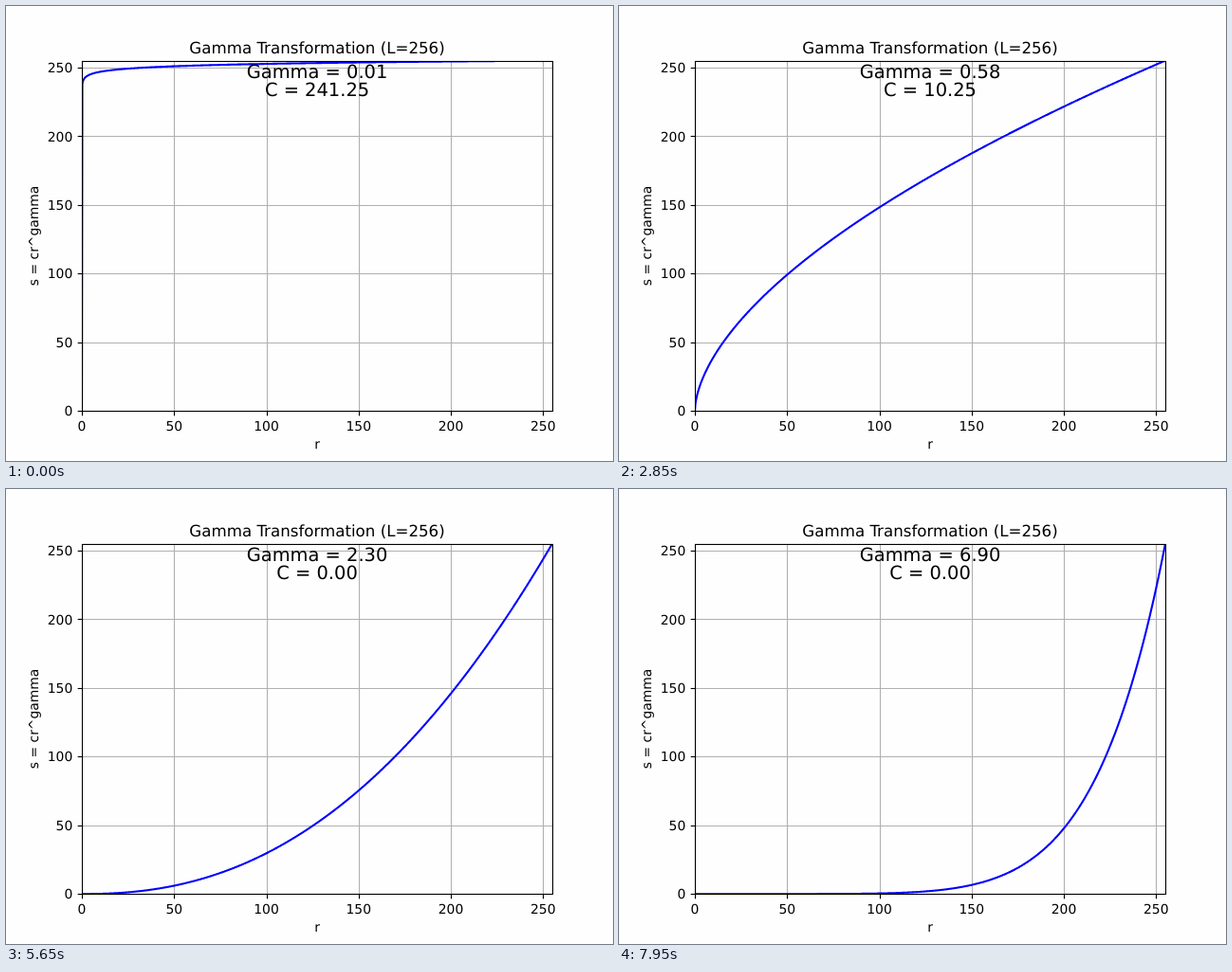
These frames come from a looping animation (640 by 480 pixels, 8000 ms). An HTML page with a canvas:

```html
<!DOCTYPE html>
<html lang="en">
<head>
<meta charset="utf-8">
<title>Gamma Transformation</title>
<style>
  html, body { margin: 0; width: 100%; height: 100%; overflow: hidden; background: #fefefe; }
  canvas { display: block; }
</style>
</head>
<body>
<canvas id="stage" width="640" height="480"></canvas>
<script>
const ctx = document.getElementById("stage").getContext("2d");

const PERIOD = 8000, STEP = 50;
const MAX = 255, SAMPLES = 1000;
const LEFT = 80, RIGHT = 576, TOP = 57.6, BOTTOM = 427.2;
const CENTER = (LEFT + RIGHT) / 2;
const POINT = 100 / 72; // pixels per typographic point
const THIN = 0.8 * POINT, TICK = 3.5 * POINT;

const toX = r => LEFT + r / MAX * (RIGHT - LEFT);
const toY = s => BOTTOM - s / MAX * (BOTTOM - TOP);
const snap = v => Math.floor(v + 0.5) + 0.5;

function line(x1, y1, x2, y2, color) {
  ctx.strokeStyle = color;
  ctx.lineWidth = THIN;
  ctx.beginPath();
  ctx.moveTo(x1, y1);
  ctx.lineTo(x2, y2);
  ctx.stroke();
}

function label(text, x, y, points, align = "center") {
  ctx.font = `${points * POINT}px "DejaVu Sans", sans-serif`;
  ctx.textAlign = align;
  ctx.fillStyle = "#000";
  ctx.fillText(text, x, y);
}

function clipToAxes(paint) {
  ctx.save();
  ctx.beginPath();
  ctx.rect(LEFT, Math.round(TOP), RIGHT - LEFT, Math.round(BOTTOM) - Math.round(TOP));
  ctx.clip();
  paint();
  ctx.restore();
}

function drawGrid() {
  for (let value = 0; value <= 250; value += 50) {
    const x = snap(toX(value)), y = snap(toY(value));
    clipToAxes(() => {
      line(x, TOP, x, BOTTOM, "#b0b0b0");
      line(LEFT, y, RIGHT, y, "#b0b0b0");
    });
    line(x, snap(BOTTOM), x, snap(BOTTOM) + TICK, "#000");
    line(snap(LEFT), y, snap(LEFT) - TICK, y, "#000");
    label(value, toX(value), 448, 10);
    label(value, LEFT - 2 * TICK, Math.round(toY(value) + 5.2), 10, "right");
  }
}

function drawCurve(gamma, c) {
  ctx.strokeStyle = "#00f";
  ctx.lineWidth = 1.5 * POINT;
  ctx.lineJoin = "round";
  ctx.lineCap = "square";
  ctx.beginPath();
  for (let i = 0; i < SAMPLES; i++) {
    const r = MAX * i / (SAMPLES - 1);
    ctx.lineTo(toX(r), toY(c * r ** gamma));
  }
  ctx.stroke();
}

function drawFrame() {
  ctx.strokeStyle = "#000";
  ctx.lineWidth = THIN;
  ctx.lineJoin = "miter";
  ctx.strokeRect(snap(LEFT), snap(TOP), RIGHT - LEFT, snap(BOTTOM) - snap(TOP));
}

// Gamma climbs by 0.01 up to 1, then by 0.1.
const gammaAt = n => n < 100 ? (n + 1) / 100 : 1 + (n - 100) / 10;

function draw(time) {
  const gamma = gammaAt(Math.floor(time % PERIOD / STEP));
  const c = MAX ** (1 - gamma);

  ctx.fillStyle = "#fefefe";
  ctx.fillRect(0, 0, 640, 480);
  ctx.textRendering = "geometricPrecision";

  drawGrid();
  clipToAxes(() => drawCurve(gamma, c));
  drawFrame();

  label("Gamma Transformation (L=256)", CENTER, 50, 12);
  label("r", CENTER, 467, 10);
  ctx.save();
  ctx.translate(34, (TOP + BOTTOM) / 2);
  ctx.rotate(-Math.PI / 2);
  label("s = cr^gamma", 0, 0, 10);
  ctx.restore();
  label(`Gamma = ${gamma.toFixed(2)}`, CENTER, 76, 14);
  label(`C = ${c.toFixed(2)}`, CENTER, 95, 14);
}

const start = performance.now();
function tick() {
  draw(performance.now() - start);
  requestAnimationFrame(tick);
}
tick();
</script>
</body>
</html>
```
